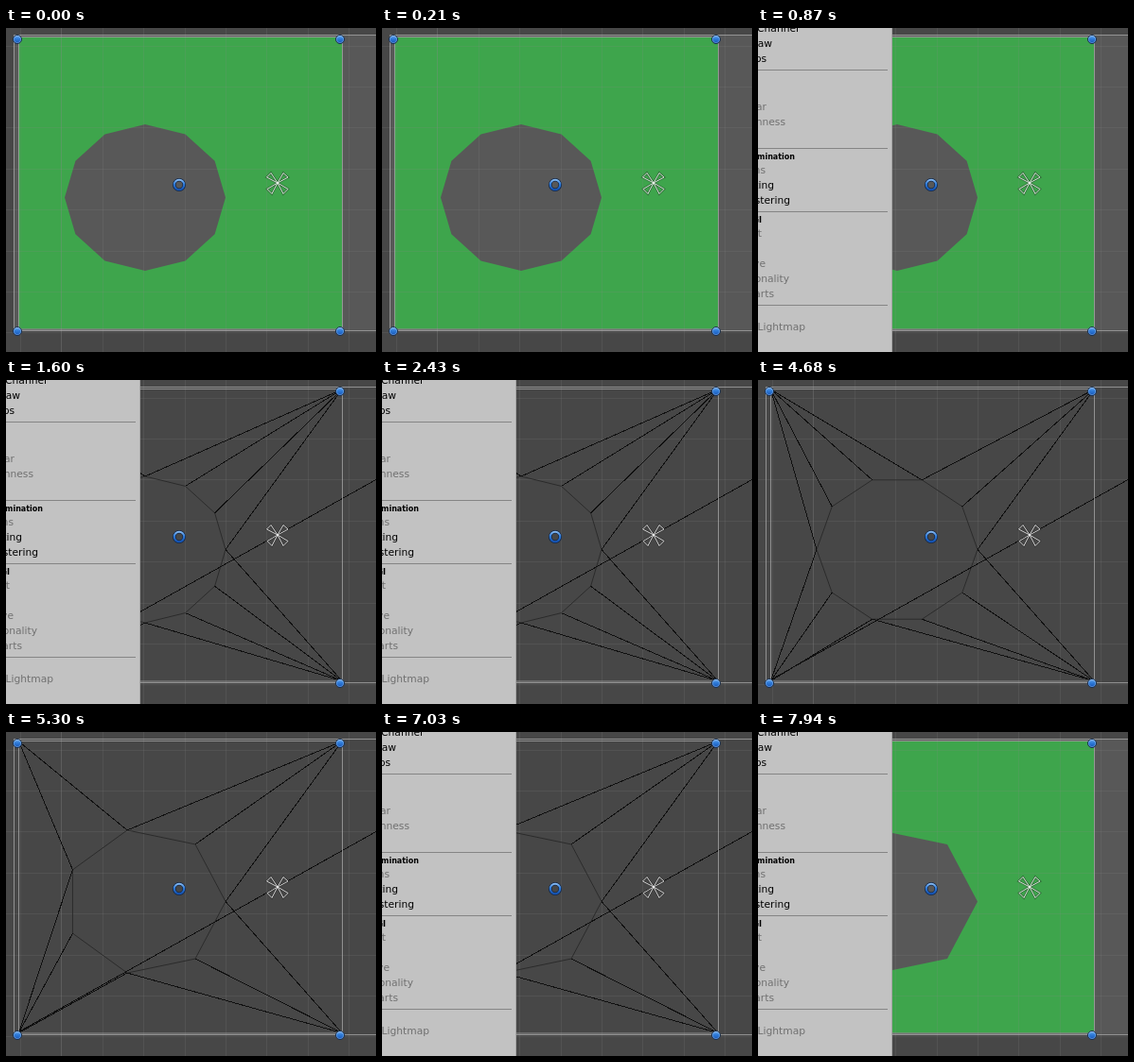
Recreate the animation shown at these times as an HTML page. Size 391x343 px, loop 8 s.

```html
<!DOCTYPE html>
<html lang="en">
<head>
<meta charset="utf-8">
<title>Mesh view</title>
<style>
  html, body { margin: 0; width: 100%; height: 100%; overflow: hidden; background: #474747; }
  svg { display: block; width: 391px; height: 343px; }
  .menu { font: 10.7px "DejaVu Sans", Verdana, sans-serif; text-anchor: end; }
  .menu .head { font-weight: bold; font-size: 8px; }
  .menu .off { fill: #707070; }
  .frame { fill: none; stroke: #b4b4b4; stroke-opacity: .68; }
  .star { fill: none; stroke: #fff; stroke-opacity: .85; stroke-width: .9; }
  .shade { stroke: #222; stroke-opacity: .4; stroke-width: 2.4; }
</style>
</head>
<body>
<svg viewBox="0 0 391 343">
  <defs>
    <linearGradient id="ball" x2="0" y2="1">
      <stop offset="0" stop-color="#84b8f0"/>
      <stop offset=".4" stop-color="#327fdc"/>
      <stop offset="1" stop-color="#1453b4"/>
    </linearGradient>
    <path id="petals" d="M287 164L280 153.500L275.500 158ZL293 153.500L298 158ZL276 170.500L281 175.500ZL293 175.500L298 170.500Z"/>
  </defs>
  <rect width="391" height="343" fill="#474747"/>
  <g id="solid">
    <rect x="8" y="7.500" width="383" height="313" fill="#585858"/>
    <path id="face" fill="#3ea54c" fill-rule="evenodd"/>
  </g>
  <g id="grid" stroke="#8a8a8a"></g>
  <g id="wire" fill="none" stroke="#101010">
    <path id="ring" stroke="#2b2b2b"/>
    <g shape-rendering="crispEdges">
      <path id="spokes"/>
      <path d="M8 320.500L391 105.500"/>
    </g>
  </g>
  <path class="frame" d="M391 7.500H8.500V320.500H391"/>
  <path class="frame" d="M13.500 319V9.500H355.500V319Z"/>
  <use href="#petals" class="star shade"/>
  <use href="#petals" class="star"/>
  <g id="dots" fill="url(#ball)" stroke="#182c48"></g>
  <circle cx="183" cy="166" r="5.200" fill="none" stroke="#14294a" stroke-width="3.600"/>
  <circle cx="183" cy="166" r="5.200" fill="none" stroke="url(#ball)" stroke-width="2"/>
  <g id="menu" class="menu">
    <rect width="142" height="343" fill="#c2c2c2"/>
    <path d="M141.500 0V343" stroke="#a4a4a4"/>
    <path d="M0 44.500H137M0 127.500H137M0 194.500H137M0 293.500H137" stroke="#858585"/>
  </g>
</svg>
<script>
const $ = id => document.getElementById(id);
const LOOP = 8000;
const L = 13.5, T = 10, R = 355, B = 318.5;
const corners = [[R, T], [L, T], [L, B], [R, B]];

const range = (start, end, step) => {
  const out = [];
  for (let v = start; v < end; v += step) out.push(v);
  return out;
};
const line = (d, alpha) => `<path d="${d}" stroke-opacity="${alpha}"/>`;
const snap = v => Math.round(v) + .5;

$('grid').innerHTML =
  range(15, 391, 43.4).map((x, i) => line(`M${snap(x)} 0V343`, i === 1 ? .34 : .17)).join('') +
  range(18.6, 343, 43.4).map(y => line(`M0 ${snap(y)}H391`, .17)).join('');

$('dots').innerHTML = [[12, 12], [353, 12], [12, 321], [353, 321]].map(([x, y]) =>
  `<circle cx="${x}" cy="${y}" r="4.500"/>
   <circle cx="${x}" cy="${y}" r="3.700" fill="none" stroke="#c4defa" stroke-opacity=".4" stroke-width=".8"/>`).join('');

// label, right edge, baseline, style
const items = [
  ['Alpha Channel', 43, 4, ''], ['Overdraw', 15, 20, ''], ['Mipmaps', 9, 36, ''],
  ['Specular', 9, 87, 'off'], ['Smoothness', 29, 103, 'off'],
  ['Illumination', 39, 139, 'head'], ['Systems', 8, 154, 'off'],
  ['Charting', 17, 170, ''], ['Clustering', 34, 186, ''],
  ['GI', 4, 206, 'head'], ['Lit', 4, 221, 'off'],
  ['Emissive', 8, 253, 'off'], ['Directionality', 33, 269, 'off'],
  ['Charts', 17, 285, 'off'], ['Lightmap', 50, 320, 'off']
];
$('menu').innerHTML += items.map(([label, x, y, style]) =>
  `<text x="${x}" y="${y}" class="${style}">${label}</text>`).join('');

function build(sides) {
  const pts = range(0, sides, 1).map(i => {
    const a = i / sides * 2 * Math.PI;
    return [147 + 85 * Math.cos(a), 179.5 - 77.5 * Math.sin(a)];
  });
  const ring = 'M' + pts.join('L') + 'Z';
  // every edge joins the corner of the quadrant it faces
  const spokes = new Set();
  pts.forEach((p, i) => {
    const c = corners[Math.floor((i + .5) / sides * 4)];
    spokes.add(`M${c}L${p}`).add(`M${c}L${pts[(i + 1) % sides]}`);
  });
  $('face').setAttribute('d', `M${L} ${T}H${R}V${B}H${L}Z${ring}`);
  $('ring').setAttribute('d', ring);
  $('spokes').setAttribute('d', [...spokes].join(''));
}

const sidesAt = t => t < 4680 ? 12 : t < 4760 ? 10 : t < 5020 ? 9 : t < 5300 ? 8 : 7;
const show = (id, on) => { $(id).style.display = on ? '' : 'none'; };
let built = 0;

function draw(now) {
  const t = now % LOOP;
  const sides = sidesAt(t);
  const wired = t >= 1600 && t < 7940;
  if (sides !== built) build(built = sides);
  show('solid', !wired);
  show('wire', wired);
  show('menu', t >= 870 && t < 2950 || t >= 7030);
}

let start;
function tick(now) {
  start ??= now;
  draw(now - start);
  requestAnimationFrame(tick);
}
draw(0);
requestAnimationFrame(tick);
</script>
</body>
</html>
```
